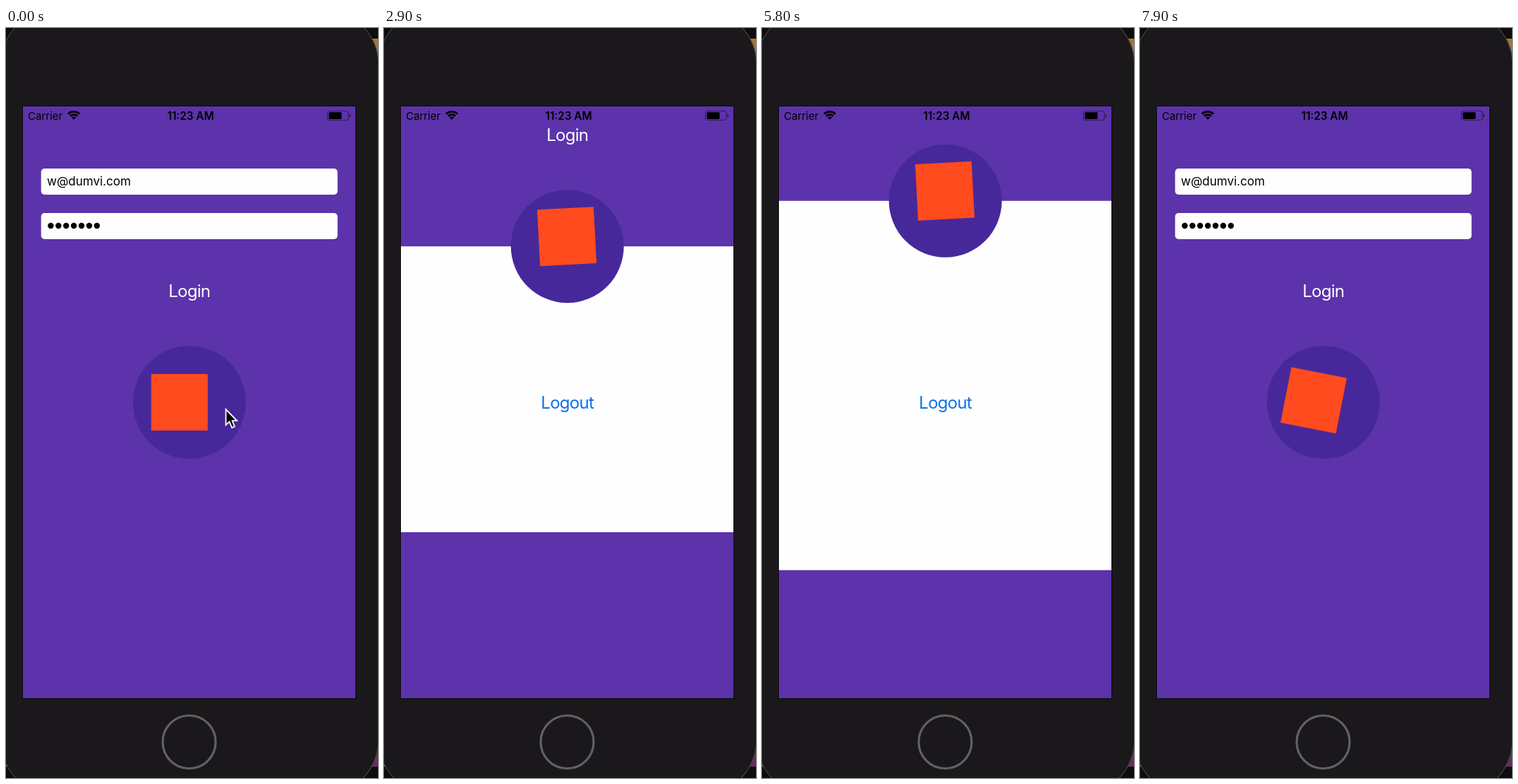
Recreate the animation shown at these times as an HTML page with a canvas. Size 527 by 1062 pixels, loop 8 s.

```html
<!DOCTYPE html>
<html lang="en">
<head>
<meta charset="utf-8">
<title>Login doors</title>
<style>
html, body { margin: 0; width: 100%; height: 100%; overflow: hidden; background: #1a181b; }
canvas { display: block; width: 527px; height: 1062px; }
</style>
</head>
<body>
<canvas id="stage" width="527" height="1062"></canvas>
<script>
const ctx = document.getElementById('stage').getContext('2d');
const LOOP = 8000;
const SCREEN = { x: 24, y: 111, w: 471, h: 838 };
const MID = { x: 259.75, y: 530 };
const PURPLE = '#5c33ab', DISC = '#47289b', ORANGE = '#ff4b1e';
const WHITE = '#fffeff', BEZEL = '#1a181b', BLUE = '#0a70ec';
const FONT = 'Inter, "Open Sans", sans-serif';

const clamp = v => Math.min(1, Math.max(0, v));
const phase = (t, start, length) => clamp((t - start) / length);
const mix = (a, b, p) => a + (b - a) * p;

// Cubic timing curve with control points (x1, 0) and (x2, 1)
function curve(x1, x2) {
  return x => {
    let lo = 0, hi = 1;
    for (let i = 0; i < 24; i++) {
      const s = (lo + hi) / 2, r = 1 - s;
      if (3 * r * r * s * x1 + 3 * r * s * s * x2 + s * s * s < x) lo = s;
      else hi = s;
    }
    return lo * lo * (3 - 2 * lo);
  };
}
const easeInOut = curve(0.42, 0.58);
const easeOut = curve(0, 0.58);

function rect(x, y, w, h, color) {
  ctx.fillStyle = color;
  ctx.fillRect(x, y, w, h);
}

function roundRect(x, y, w, h, r, fill, stroke, width = 1) {
  ctx.beginPath();
  ctx.roundRect(x, y, w, h, r);
  if (fill) { ctx.fillStyle = fill; ctx.fill(); }
  if (stroke) { ctx.strokeStyle = stroke; ctx.lineWidth = width; ctx.stroke(); }
}

function circle(x, y, r, fill) {
  ctx.beginPath();
  ctx.arc(x, y, r, 0, Math.PI * 2);
  ctx.fillStyle = fill;
  ctx.fill();
}

function label(str, x, y, { size, color = '#000', weight = 400, align = 'left', spacing = 0 }) {
  ctx.font = `${weight} ${size}px ${FONT}`;
  ctx.letterSpacing = spacing + 'px';
  ctx.textAlign = align;
  ctx.textBaseline = 'alphabetic';
  ctx.fillStyle = color;
  ctx.fillText(str, x, y);
}

function button(str, y, color, alpha) {
  ctx.globalAlpha = alpha;
  label(str, MID.x, y, { size: 24, color, align: 'center', spacing: -0.7 });
  ctx.globalAlpha = 1;
}

// A pressed button dims, then fades back
const press = (t, down, up) => t < down ? 1 : mix(0.25, 1, phase(t, up, 280));

function phone() {
  rect(0, 0, 527, 1062, '#0e0c0f');
  rect(500, 15, 27, 300, '#a8762b');
  rect(500, 800, 27, 246, '#6a2b5f');
  rect(0, 900, 20, 146, '#69676a');
  roundRect(-8, -27, 536, 1114, 80, BEZEL, '#454346', 1.2);
  ctx.beginPath();
  ctx.arc(259.5, 1011, 37.5, 0, Math.PI * 2);
  ctx.strokeStyle = '#626063';
  ctx.lineWidth = 3.2;
  ctx.stroke();
  rect(SCREEN.x - 1, SCREEN.y - 1, SCREEN.w + 2, SCREEN.h + 2, '#0b090c');
}

function statusBar() {
  label('Carrier', 31, 129.5, { size: 15 });
  label('11:23 AM', 261.5, 129.5, { size: 15.3, weight: 600, align: 'center' });

  const left = -Math.PI * 0.75, right = -Math.PI * 0.25;
  ctx.strokeStyle = '#000';
  ctx.lineWidth = 2.6;
  for (const r of [11.4, 7.2]) {
    ctx.beginPath();
    ctx.arc(96, 129.8, r, left, right);
    ctx.stroke();
  }
  ctx.beginPath();
  ctx.moveTo(96, 129.8);
  ctx.arc(96, 129.8, 4.4, left, right);
  ctx.fillStyle = '#000';
  ctx.fill();

  roundRect(455.5, 117.5, 29.5, 13, 3.2, null, 'rgba(0,0,0,.45)', 1.2);
  roundRect(457.5, 119.3, 18, 9.6, 1.4, '#000');
  roundRect(486.3, 122, 1.7, 4.4, 0.8, 'rgba(0,0,0,.5)');
}

function caretAlpha(t) {
  const p = (t % 1000) / 1000;
  return clamp((p - 0.1) / 0.1) * clamp((0.76 - p) / 0.12);
}

function form(t) {
  roundRect(49.7, 199, 420, 37, 5, WHITE);
  roundRect(49.7, 262, 420, 37, 5, WHITE);
  label('w@dumvi.com', 58, 223.2, { size: 17 });
  for (let i = 0; i < 7; i++) circle(63.4 + i * 10.9, 280, 4.2, '#000');
  ctx.globalAlpha = caretAlpha(t);
  rect(132.6, 268, 2.5, 21, '#3b66dc');
  ctx.globalAlpha = 1;
  button('Login', 381, '#fff', press(t, 940, 985));
}

function badge(angle) {
  circle(MID.x, MID.y, 80, DISC);
  ctx.save();
  ctx.translate(MID.x, MID.y);
  ctx.rotate(angle);
  rect(-54, -40, 80, 80, ORANGE);
  ctx.restore();
}

// Each leg: start, end, from x, y, to x, y
const LEGS = [
  [0, 100, 311.5, 540, 311.5, 540],
  [100, 750, 311.5, 540, 268, 374],
  [750, 1050, 268, 374, 268, 374],
  [1050, 1450, 268, 374, 540, 470],
  [4650, 5100, 540, 640, 268, 532],
  [5100, 5380, 268, 532, 268, 532],
  [5380, 5700, 268, 532, 540, 620]
];

function pointer(t) {
  const leg = LEGS.find(([a, b]) => t >= a && t < b);
  if (!leg) return;
  const [a, b, x0, y0, x1, y1] = leg;
  const p = easeInOut(phase(t, a, b - a));
  ctx.save();
  ctx.translate(mix(x0, x1, p), mix(y0, y1, p));
  ctx.beginPath();
  ctx.moveTo(0, 0);
  for (const [x, y] of [[0, 22], [5, 17.6], [8.6, 26], [12.4, 24.3], [9, 16.2], [15.6, 16]]) ctx.lineTo(x, y);
  ctx.closePath();
  ctx.fillStyle = '#000';
  ctx.strokeStyle = '#fff';
  ctx.lineWidth = 1.8;
  ctx.fill();
  ctx.stroke();
  ctx.restore();
}

function draw(t) {
  const open = easeInOut(phase(t, 1972, 2000)) - easeOut(phase(t, 5365, 1500));
  const turn = easeInOut(phase(t, 985, 1000)) - easeInOut(phase(t, 7150, 1000));
  const up = 503 * open, down = 419 * open;

  phone();
  ctx.save();
  ctx.beginPath();
  ctx.rect(SCREEN.x, SCREEN.y, SCREEN.w, SCREEN.h);
  ctx.clip();

  rect(SCREEN.x, SCREEN.y, SCREEN.w, SCREEN.h, WHITE);
  button('Logout', 539, BLUE, press(t, 5200, 5330));
  rect(SCREEN.x, MID.y + down, SCREEN.w, 419, PURPLE);

  ctx.save();
  ctx.translate(0, -up);
  rect(SCREEN.x, SCREEN.y, SCREEN.w, MID.y - SCREEN.y, PURPLE);
  form(t);
  badge(turn * 87 * Math.PI / 180);
  ctx.restore();

  statusBar();
  ctx.restore();
  pointer(t);
}

function tick() {
  draw(performance.now() % LOOP);
  requestAnimationFrame(tick);
}
tick();
</script>
</body>
</html>
```
